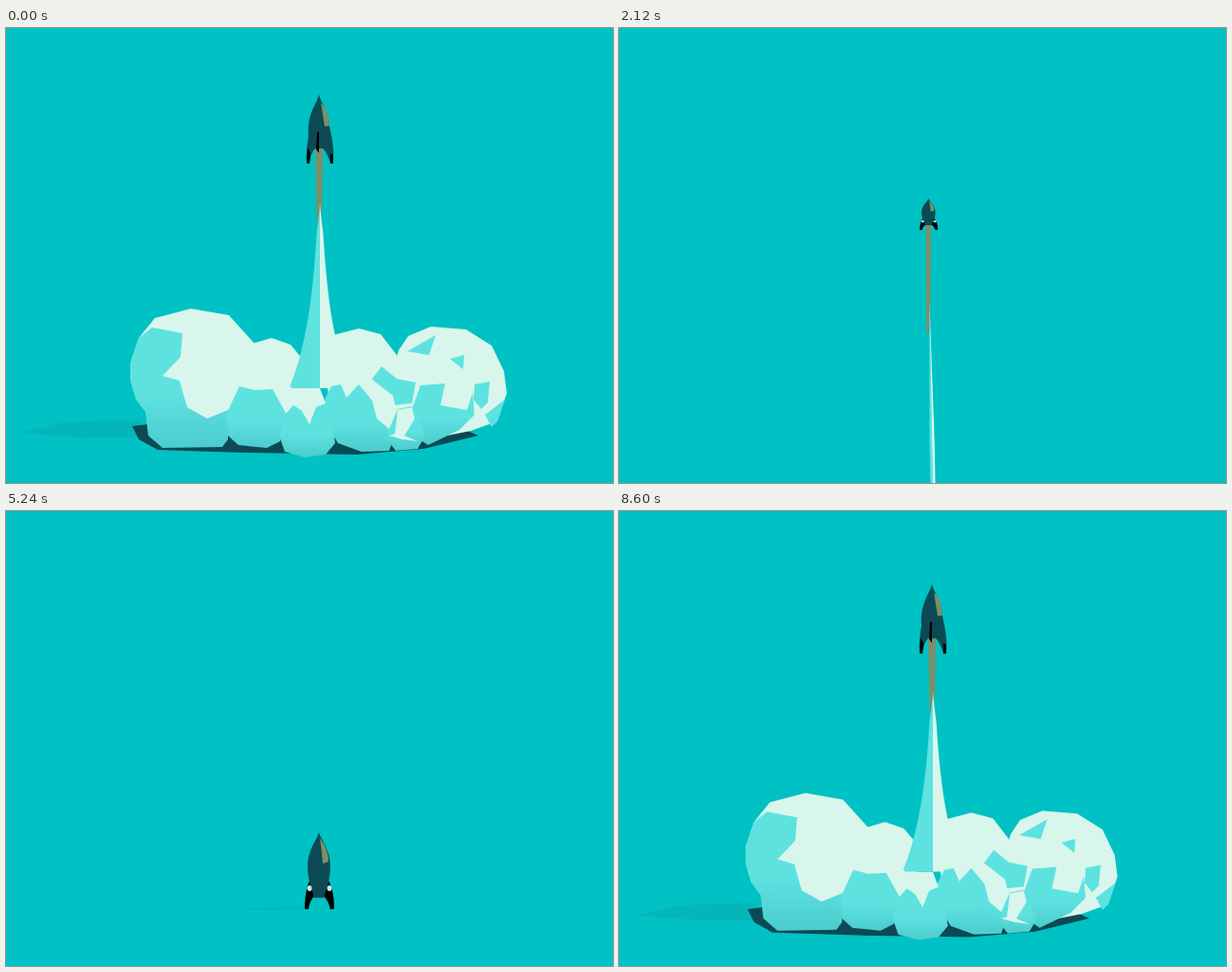
Recreate the animation shown at these times as an HTML page. Size 640 px wide and 480 px high, loop 8640 ms.

```html
<!DOCTYPE html>
<html lang="en">
<head>
<meta charset="utf-8">
<title>Rocket</title>
<style>
html, body { margin: 0; width: 100%; height: 100%; overflow: hidden; background: #00c1c3; }
svg { display: block; width: 100vw; height: 100vh; }
.white { fill: #d8f6ec; }
.cyan { fill: #5ee2e0; }
.shade { fill: url(#shade); }
.dark { fill: #0b4a54; }
.olive { fill: #7a9068; }
</style>
</head>
<body>
<svg viewBox="0 0 640 480">
  <defs>
    <linearGradient id="shade" x1="0" y1="0" x2="0" y2="1">
      <stop offset=".55" stop-color="#5ee2e0"/>
      <stop offset="1" stop-color="#4bcccd"/>
    </linearGradient>
  </defs>
  <path id="groundShadow" d="M245 419L316 417V421L255 421Z" fill="#00b9bc"/>

  <g id="back">
    <polygon points="15,427 60,416 140,413 150,432 80,432" fill="#04b6ba"/>
    <polygon class="dark" points="133,420 150,418 480,422 498,430 440,444 370,450 250,448 160,445 140,434"/>
    <!-- left -->
    <polygon class="white" points="131,354 140,327 157,306 195,296 235,303 262,333 268,370 252,388 235,405 200,420 140,390"/>
    <polygon class="shade" points="131,354 140,327 154,316 186,322 184,347 165,367 183,372 191,400 212,412 234,403 234,434 228,442 165,443 150,430 147,405 137,392 131,372"/>
    <!-- inner pair -->
    <polygon class="white" points="256,334 280,327 300,334 310,346 315,400 262,400 245,380"/>
    <polygon class="white" points="335,330 345,324 372,317 395,323 412,345 416,380 340,390"/>
    <!-- right -->
    <polygon class="white" points="408,360 414,340 424,325 448,315 485,318 512,335 525,362 528,385 518,415 490,425 440,435 410,405"/>
    <polygon class="cyan" points="423,341 453,324 446,345"/>
    <polygon class="cyan" points="468,349 483,345 482,360"/>
    <polygon class="cyan" points="494,376 510,373 508,395 501,402 493,392"/>
    <polygon class="shade" points="428,402 437,377 463,375 458,398 486,403 492,385 494,408 478,424 445,440 430,430"/>
    <polygon class="cyan" points="505,408 526,392 518,415 512,421"/>
    <polygon class="cyan" points="383,374 396,357 412,370 432,374 428,396 408,398"/>
  </g>

  <polygon id="flame" class="olive"/>
  <polygon id="trailLeft" class="cyan"/>
  <polygon id="trailRight" class="white"/>

  <g id="upright">
    <g id="fins">
      <path d="M-8 48Q-15 58 -15 81H-11Q-10 72 -4 66Z"/>
      <path d="M8 48Q16 58 16 81H12Q10 72 4 66Z"/>
    </g>
    <path class="dark" d="M0 0C2 8 12 18 12 36C12 50 7 62 5 69H-5C-7 62 -12 50 -12 36C-12 18 -2 8 0 0Z"/>
    <path class="olive" d="M1 6L6 14Q10 22 10 31L4 33Q3 20 1 6Z"/>
    <g id="windows"><ellipse cx="-10" cy="59" rx="2.5" ry="3"/><ellipse cx="11" cy="59" rx="2.5" ry="3"/></g>
  </g>
  <g id="tilted">
    <path class="dark" d="M0 0C1 8 11 18 11 34L14 48Q16 60 15 73H12Q9 62 4 57H-4Q-9 62 -10 73H-13Q-14 58 -11 44C-13 20 -2 10 0 0Z"/>
    <path class="olive" d="M2 9Q11 17 11 33L6 34Z"/>
    <path d="M-12 56L-9 62L-10 73H-13ZM-2 40H0V62L-3 58ZM12 62L15 64V73H12Z"/>
  </g>

  <g id="front">
    <polygon class="white" points="246,377 262,373 300,378 308,392 296,410 270,400"/>
    <polygon class="shade" points="233,406 246,378 262,382 281,381 296,408 289,436 275,443 245,440 234,430"/>
    <polygon class="white" points="335,398 345,378 385,370 408,388 413,410 408,432 385,430"/>
    <polygon class="shade" points="333,398 343,378 353,376 359,390 372,376 386,393 391,412 410,428 404,446 375,447 350,438 339,420"/>
    <polygon class="shade" points="400,432 413,402 428,399 442,430 434,444 411,446"/>
    <polygon class="white" points="404,430 410,428 413,403 428,400 431,412 420,430 434,436 418,434"/>
    <polygon class="shade" points="288,430 294,408 304,397 333,397 344,418 347,438 337,450 315,453 294,447"/>
    <polygon class="white" points="302,397 309,380 331,380 337,396 327,400 320,418 312,404"/>
  </g>
</svg>
<script>
const LOOP = 8640, STEP = 40, LANDING = 3560, CX = 330, GROUND = 416;
const el = id => document.getElementById(id);
const show = (id, on) => el(id).setAttribute('display', on ? 'inline' : 'none');
const place = (id, value) => el(id).setAttribute('transform', value);
const points = (id, list) => el(id).setAttribute('points', list.map(p => p.map(v => v.toFixed(2))).join(' '));

// Monotone cubic curve through [time, value] keys.
function curve(...keys) {
  const slope = i => (keys[i + 1][1] - keys[i][1]) / (keys[i + 1][0] - keys[i][0]);
  const last = keys.length - 1;
  const tangent = keys.map((_, i) => {
    if (i === 0) return slope(0);
    if (i === last) return slope(last - 1);
    const a = slope(i - 1), b = slope(i);
    return a * b <= 0 ? 0 : 2 * a * b / (a + b);
  });
  return t => {
    if (t <= keys[0][0]) return keys[0][1];
    if (t >= keys[last][0]) return keys[last][1];
    let i = 0;
    while (t > keys[i + 1][0]) i++;
    const [t0, a] = keys[i], [t1, b] = keys[i + 1], d = t1 - t0, u = (t - t0) / d;
    return a + (b - a) * u * u * (3 - 2 * u)
      + d * u * (1 - u) * (tangent[i] * (1 - u) - tangent[i + 1] * u);
  };
}

// One flight runs from the landing approach until the rocket is far away.
const noseY = curve([3560, 22], [3960, 177], [4400, 292], [5240, 339], [6440, 339], [7120, 327],
  [7320, 310], [8200, 170], [8640, 70], [9140, 10], [9520, 31], [9600, 38],
  [10400, 127], [10760, 180], [11280, 266], [12160, 420]);
const noseX = curve([8640, 330], [9600, 328.7], [10760, 326.3], [12160, 325.5]);
const height = curve([3560, 81], [6440, 81], [7120, 83], [8200, 76], [8640, 73], [9600, 51], [10760, 33], [12160, 17]);
const width = curve([7320, 31], [8640, 29], [9600, 26], [10760, 19], [12160, 12]);
const flameLength = curve([5600, 0], [6440, 8], [7120, 15], [8200, 65], [8640, 85], [9600, 120], [12160, 110]);
const cloudSize = curve([5600, 0], [5800, .05], [6440, .225], [7120, .455], [7320, .535],
  [8200, .845], [8640, 1], [9600, 1.25], [12160, 1.5]);

function drawExhaust(t, x, y, h, size, pan) {
  const lit = t >= 5600;
  const base = GROUND - 36 * size + pan;
  const top = y + h * (t < 7800 ? .82 : .76);
  const length = flameLength(t);
  const bottom = Math.min(top + length, base + 20);
  const half = width(t) * .14;
  show('flame', lit);
  points('flame', [[x - half, top], [x + half, top], [x + half * .8, bottom - length * .25],
    [x + .5, bottom], [x - 2.2, bottom]]);

  const apex = bottom - length * .3, end = Math.min(base, 484);
  const visible = lit && apex < end;
  show('trailLeft', visible);
  show('trailRight', visible);
  if (!visible) return;
  const left = [], right = [], steps = 28;
  for (let i = 0; i <= steps; i++) {
    const yy = apex + (end - apex) * i / steps;
    const taper = Math.min(1, (yy - apex) / 150);
    const center = x + 1 + (331 - x - 1) * i / steps;
    const spread = Math.min(1, (yy - apex) / 30) * 30 * size * Math.exp((yy - base) / (70 * size)) + 2.6 * taper;
    left.push([center - spread, yy]);
    right.push([center + spread, yy]);
    if (i === steps) {
      left.push([center, yy]);
      right.push([center, yy]);
    }
  }
  points('trailLeft', [...left, [x + 1, apex]]);
  points('trailRight', [...right, [x + 1, apex]]);
}

function draw(time) {
  const t = time < LANDING ? time + LOOP : time;
  const x = noseX(t), y = noseY(t), h = height(t), size = cloudSize(t);
  const pan = 169 * (Math.max(0, t - LOOP - 100) / 860) ** 2;

  const tilted = t > 7700 && t < 9200;
  show('upright', !tilted);
  show('tilted', tilted);
  place('upright', `translate(${x} ${y}) scale(${width(t) / 31} ${h / 81})`);
  place('tilted', `translate(${x} ${y}) scale(${width(t) / 29} ${h / 73})`);
  el('windows').setAttribute('fill', t < 4400 ? '#0b4a54' : '#bfeee6');
  show('groundShadow', t > 4200 && t < 6800);

  const clouds = size > 0 && pan < 400;
  show('back', clouds);
  show('front', clouds);
  place('back', `translate(${CX} ${GROUND + pan}) scale(${size}) translate(${-CX} ${-GROUND})`);
  const squash = Math.min(1, .62 + .38 * size);
  place('front', `translate(${CX} ${GROUND + 36 * size + pan}) scale(${size} ${size * squash}) translate(${-CX} -452)`);

  drawExhaust(t, x, y, h, size, pan);
}

let start;
function frame(now) {
  start ??= now;
  draw(Math.floor((now - start) % LOOP / STEP) * STEP);
  requestAnimationFrame(frame);
}
draw(0);
requestAnimationFrame(frame);
</script>
</body>
</html>
```
